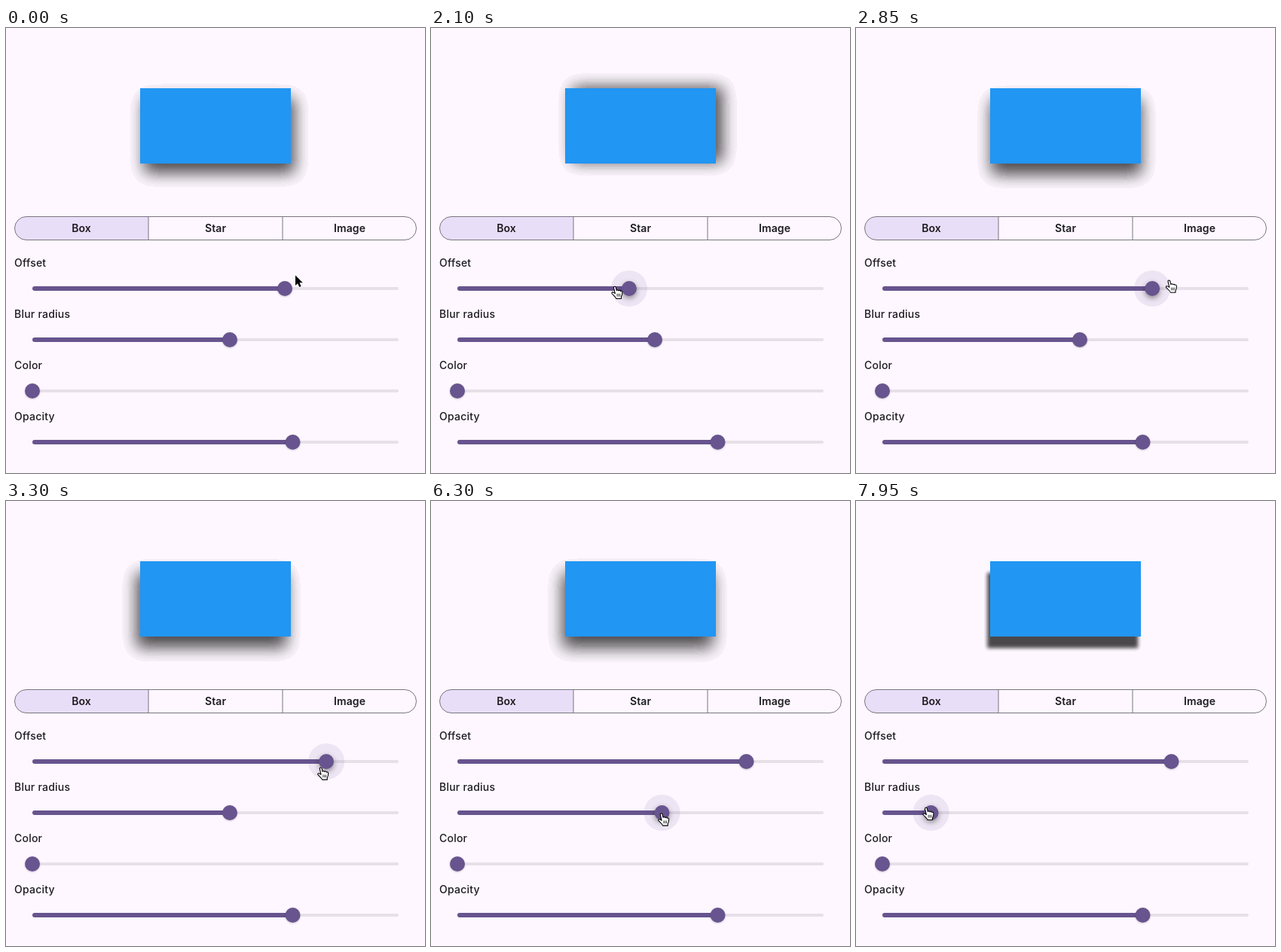
An HTML page for the animation above (8000 ms loop, 556x591 px).

```html
<!DOCTYPE html>
<html lang="en">
<head>
<meta charset="utf-8">
<title>Shadow controls</title>
<style>
  html, body { margin: 0; width: 100%; height: 100%; overflow: hidden; background: #fef7ff; }
  svg { display: block; width: 100vw; height: 100vh; }
  text { font: 450 14px Inter, "Open Sans", sans-serif; letter-spacing: .22px; fill: #1d1b20; }
  .tab { font-weight: 600; letter-spacing: .1px; text-anchor: middle; }
  .outline { fill: none; stroke: #7b757f; }
  .rail { fill: #e7e0e8; }
  .active, .thumb, .halo { fill: #68548e; }
</style>
</head>
<body>
<svg viewBox="0 0 556 591">
  <defs>
    <filter id="soft" filterUnits="userSpaceOnUse" x="90" y="0" width="376" height="250">
      <feGaussianBlur id="blur"/>
      <feComponentTransfer><feFuncA id="bands" type="discrete"/></feComponentTransfer>
    </filter>
    <clipPath id="pill"><rect x="11.5" y="250.5" width="533" height="31" rx="15.5"/></clipPath>
  </defs>

  <rect width="556" height="591" fill="#fef7ff"/>
  <g filter="url(#soft)">
    <rect id="shadow" x="178" y="80" width="200" height="100" fill-opacity=".711"/>
  </g>
  <rect x="178" y="80" width="200" height="100" fill="#2196f3"/>

  <rect x="11" y="250" width="178" height="32" fill="#e9def8" clip-path="url(#pill)"/>
  <rect class="outline" x="11.5" y="250.5" width="533" height="31" rx="15.5"/>
  <path class="outline" d="M189 251V281M367 251V281"/>
  <text class="tab" x="100" y="271">Box</text>
  <text class="tab" x="278" y="271">Star</text>
  <text class="tab" x="456" y="271">Image</text>

  <g id="sliders"></g>

  <g id="cursor">
    <path id="arrow" d="M0 .5V14L3.1 11.2L5.2 16L7.6 15L5.5 10.3H9.8Z" stroke="#fff" stroke-width="1.1" paint-order="stroke"/>
    <g id="hand" transform="scale(1.1 1.05) translate(-.6)" fill="#fff" stroke="#000" stroke-linejoin="round" stroke-linecap="round">
      <path d="M5.2 9.8L3.6 2.6C3.2.8 5.6.2 6.1 2L7 6C7.4 5 9.2 5 9.4 6.3C10 5.4 11.5 5.6 11.7 6.9C12.4 6.2 13.8 6.6 13.9 8C14 10.5 13.7 12 12.7 13.6L12.6 16.3H6.6C6.2 14.4 3.6 12.6 1.6 10.2C.4 8.6 2.2 7.6 3.4 8.6Z"/>
      <path d="M7.7 10.4V13.2M9.4 10.4V13.2M11.1 10.4V13.2" stroke-width=".7"/>
    </g>
  </g>
</svg>
<script>
const LOOP = 8000, STEP = 150, FADE = 300;
const RAIL_START = 35, RAIL_LENGTH = 486;
const GRIP = 5.5, LAG = 88; // a dragged thumb trails the fingertip

const byId = id => document.getElementById(id);
const clamp = v => Math.min(1, Math.max(0, v));
const ease = p => p * p * (3 - 2 * p);
const pulse = (time, on, off) => clamp((time - on) / FADE) - clamp((time - off) / FADE);

// The pointer rests or turns at these points and eases between them.
const stops = [
  { at: 600, x: 384, y: 328 },
  { at: 1200, x: 363, y: 351 },
  { at: 1650, x: 351, y: 353 },
  { at: 2150, x: 236, y: 342 },
  { at: 3050, x: 436, y: 333 },
  { at: 3300, x: 413, y: 353 },
  { at: 4350, x: 413, y: 353 },
  { at: 5100, x: 301, y: 414 },
  { at: 6300, x: 301, y: 414 },
  { at: 7200, x: 142, y: 410 },
  { at: 8100, x: 84, y: 406 }
];

function pointer(time) {
  const i = Math.max(1, stops.findIndex(stop => stop.at > time));
  const a = stops[i - 1], b = stops[i];
  const p = ease(clamp((time - a.at) / (b.at - a.at)));
  return { x: a.x + (b.x - a.x) * p, y: a.y + (b.y - a.y) * p };
}

function addSlider(label, y, rest, drag) {
  const group = document.createElementNS("http://www.w3.org/2000/svg", "g");
  group.innerHTML = `
    <text x="11" y="${y - 29}">${label}</text>
    <rect class="rail" x="${RAIL_START}" y="${y - 2}" width="${RAIL_LENGTH}" height="4" rx="2"/>
    <rect class="active" x="${RAIL_START}" y="${y - 3}" height="6" rx="3"/>
    <circle class="halo" cy="${y}" r="24"/>
    <circle class="thumb" cy="${y}" r="10"/>`;
  byId("sliders").append(group);
  const [active, halo, thumb] = [".active", ".halo", ".thumb"].map(s => group.querySelector(s));

  return time => {
    const x = drag && time >= drag.press ? pointer(Math.min(time, drag.release) - LAG).x + GRIP : rest;
    const glow = drag ? pulse(time, drag.enter, drag.leave) : 0;
    const lift = drag ? pulse(time, drag.press - FADE, drag.release) : 0;
    active.setAttribute("width", x - RAIL_START);
    halo.setAttribute("cx", x);
    halo.setAttribute("opacity", .11 * glow);
    thumb.setAttribute("cx", x);
    thumb.style.filter =
      `drop-shadow(0 ${1 + 2.5 * lift}px ${1 + 2.5 * lift}px rgba(0,0,0,${.2 + .2 * lift}))`;
    return (x - RAIL_START) / RAIL_LENGTH;
  };
}

const moveOffset = addSlider("Offset", 346, 370, { enter: 1200, press: 1800, release: 3900, leave: 4350 });
const moveBlur = addSlider("Blur radius", 414, 297, { enter: 4950, press: 6300, release: LOOP, leave: LOOP });
addSlider("Color", 482, 35)(0);
addSlider("Opacity", 550, 380.5)(0);

// The soft shadow falls off in visible bands.
byId("bands").setAttribute("tableValues",
  Array.from({ length: 40 }, (_, i) => i && (i + .5) / 40).join(" "));

function draw(now) {
  const time = Math.floor((now % LOOP) / STEP) * STEP;
  const offset = moveOffset(time), blur = moveBlur(time);

  // The offset slider sets both the direction and the distance of the shadow.
  const angle = (2 * offset - 1) * Math.PI, distance = 20 * offset;
  byId("shadow").setAttribute("x", 178 + distance * Math.cos(angle));
  byId("shadow").setAttribute("y", 80 + distance * Math.sin(angle));
  byId("blur").setAttribute("stdDeviation", 20 * blur);

  const { x, y } = pointer(time);
  const overSlider = time > 1200 && Math.abs(y - 382) > 10;
  byId("cursor").setAttribute("transform", `translate(${x} ${y})`);
  byId("hand").style.display = overSlider ? "" : "none";
  byId("arrow").style.display = overSlider ? "none" : "";
}

const start = performance.now();
function tick() {
  draw(performance.now() - start);
  requestAnimationFrame(tick);
}
tick();
</script>
</body>
</html>
```
